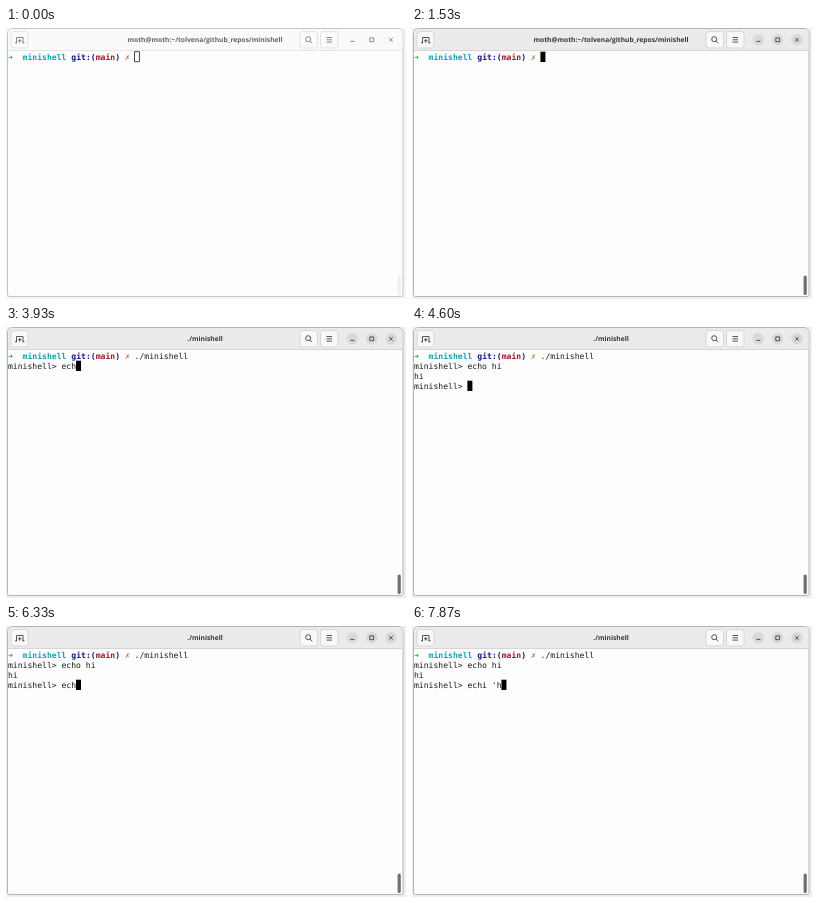
Write an HTML page with a canvas that moves like this. It is 400 by 271 pixels and loops after 8 s.

```html
<!DOCTYPE html>
<html lang="en">
<head>
<meta charset="utf-8">
<title>Terminal</title>
<style>
  html, body { margin: 0; width: 100%; height: 100%; overflow: hidden; background: #f3f3f3; }
  canvas { position: absolute; left: 0; top: 0; width: 400px; height: 271px; }
  #title {
    position: absolute; left: 99px; top: 6px; width: 200px; text-align: center; white-space: pre;
    font: bold 6.7px/12px "Open Sans", "Noto Sans", sans-serif; text-rendering: geometricPrecision;
  }
  #term span {
    position: absolute; white-space: pre; color: #1b1b1b;
    font: 8.09px/10px "DejaVu Sans Mono", monospace; text-rendering: geometricPrecision;
  }
  #term .b { font-weight: bold; }
</style>
</head>
<body>
<canvas id="stage"></canvas>
<div id="title"></div>
<div id="term"></div>
<script>
const LOOP = 8000, COL = 4.87, ROW = 10, LEFT = 2, TOP = 24;
const SHELL_TITLE = 'moth@moth:~/tolvena/github_repos/minishell';
const FOCUS = 930, LAUNCH = 2870, ENTER = 4600;

const canvas = document.getElementById('stage');
const title = document.getElementById('title');
const term = document.getElementById('term');
const ratio = window.devicePixelRatio || 1;
canvas.width = 400 * ratio;
canvas.height = 271 * ratio;
const ctx = canvas.getContext('2d');

function addText(col, row, text = '', color = '', bold = false) {
  const el = document.createElement('span');
  el.style.left = LEFT + col * COL + 'px';
  el.style.top = TOP + row * ROW + 'px';
  if (color) el.style.color = color;
  if (bold) el.className = 'b';
  el.textContent = text;
  term.append(el);
  return el;
}

addText(0, 0, '➜', '#26a23a', true);
addText(3, 0, 'minishell', '#12a3ab', true);
addText(13, 0, 'git:(', '#15158e', true);
addText(18, 0, 'main', '#a0182a', true);
addText(22, 0, ')', '#15158e', true);
addText(24, 0, '✗', '#b07a1c', true);
const lines = [addText(26, 0), addText(0, 1), addText(0, 2), addText(0, 3)];

// Each entry is [time, text on the command line from then on].
const launchKeys = [[2130, '.'], [2200, './'], [2270, './m'], [2330, './mi'], [2470, './minishell']];
const echoKeys = [[3600, 'e'], [3730, 'ec'], [3870, 'ech'], [4000, 'echo'], [4070, 'echo '],
  [4200, 'echo h'], [4330, 'echo hi']];
const typoKeys = [[6000, 'e'], [6130, 'ec'], [6270, 'ech'], [6530, 'echi'], [6730, 'echi '],
  [7400, "echi '"], [7800, "echi 'h"]];
// Spans during which the block cursor is dark.
const blinks = [[1600, 2130], [2600, LAUNCH], [3470, 3600], [5200, 5800], [7330, 7400]];

function typed(keys, t) {
  let text = '';
  for (const [at, value] of keys) if (t >= at) text = value;
  return text;
}

function setText(el, text) {
  if (el.textContent !== text) el.textContent = text;
}

function box(x, y, w, h, r, fill, line) {
  ctx.beginPath();
  ctx.roundRect(x, y, w, h, r);
  if (fill) { ctx.fillStyle = fill; ctx.fill(); }
  if (line) { ctx.strokeStyle = line; ctx.stroke(); }
}

function path(color, ...points) {
  ctx.strokeStyle = color;
  ctx.beginPath();
  for (let i = 0; i < points.length; i += 4) {
    ctx.moveTo(points[i], points[i + 1]);
    ctx.lineTo(points[i + 2], points[i + 3]);
  }
  ctx.stroke();
}

function drawWindow(f) {
  const gray = (idle, active) => {
    const v = Math.round(idle + (active - idle) * f);
    return `rgb(${v},${v},${v})`;
  };
  const icon = gray(110, 45), edge = gray(220, 208), face = gray(251, 248);

  ctx.fillStyle = gray(244, 238);
  ctx.fillRect(0, 0, 400, 271);
  ctx.lineWidth = 1;
  box(1.5, 0.5, 395.5, 268, [5, 5, 2, 2], '#fefdfe', gray(198, 180));
  box(2, 1, 394.5, 22, [4.5, 4.5, 0, 0], gray(250, 235));
  path(gray(228, 214), 2, 22.5, 396.5, 22.5);

  ctx.lineWidth = 0.8;
  for (const [x, w] of [[5, 17], [294, 17.5], [314.5, 17.5]]) box(x, 3.6, w, 16.4, 2.5, face, edge);

  // New tab
  path(icon, 10.5, 15, 10.5, 9.5, 10.5, 9.5, 17, 9.5, 17, 9.5, 17, 15,
    9, 14.8, 11, 14.8, 16.5, 14.8, 18.5, 14.8, 13.75, 11, 13.75, 14.6, 12, 12.8, 15.5, 12.8);
  // Search
  ctx.beginPath();
  ctx.arc(302.2, 11.2, 2.5, 0, 2 * Math.PI);
  ctx.stroke();
  path(icon, 304, 13, 306.2, 15.2);
  // Menu
  for (const y of [9.5, 11.8, 14.1]) path(icon, 320.5, y, 326, y);
  // Window controls
  for (const x of [346.3, 365.7, 385]) box(x - 5.7, 6.1, 11.4, 11.4, 5.7, gray(250, 217));
  path(icon, 344.4, 13.4, 348.4, 13.4);
  box(363.8, 9.9, 3.8, 3.8, 0, '', icon);
  path(icon, 383.2, 10, 386.8, 13.6, 386.8, 10, 383.2, 13.6);

  box(391.6, 247.5, 3.2, 19.5, 1.6, gray(238, 112));
}

function drawCursor(col, row, t) {
  const x = LEFT + col * COL, y = TOP + row * ROW - 0.3;
  if (t < FOCUS) {
    ctx.lineWidth = 0.9;
    box(x - 0.1, y, 4.9, 10, 0, '', '#333');
  } else if (!blinks.some(([from, to]) => t >= from && t < to)) {
    box(x - 0.2, y, 5, 10.3, 0, '#000');
  }
}

function render(t) {
  const p = Math.min(1, Math.max(0, (t - FOCUS + 60) / 200));
  const f = 1 - (1 - p) ** 2;
  const prompt = 'minishell> ';
  const running = t >= LAUNCH, echoed = t >= ENTER;
  const text = [
    typed(launchKeys, t),
    running ? prompt + typed(echoKeys, t) : '',
    echoed ? 'hi' : '',
    echoed ? prompt + typed(typoKeys, t) : ''
  ];
  lines.forEach((el, i) => setText(el, text[i]));
  setText(title, running ? './minishell' : SHELL_TITLE);
  const shade = Math.round(100 - 45 * f);
  title.style.color = `rgb(${shade},${shade},${shade})`;

  ctx.setTransform(ratio, 0, 0, ratio, 0, 0);
  drawWindow(f);
  const row = echoed ? 3 : running ? 1 : 0;
  drawCursor(text[row].length + (row ? 0 : 26), row, t);
}

const start = performance.now();
function tick() {
  render((performance.now() - start) % LOOP);
  requestAnimationFrame(tick);
}
tick();
</script>
</body>
</html>
```
